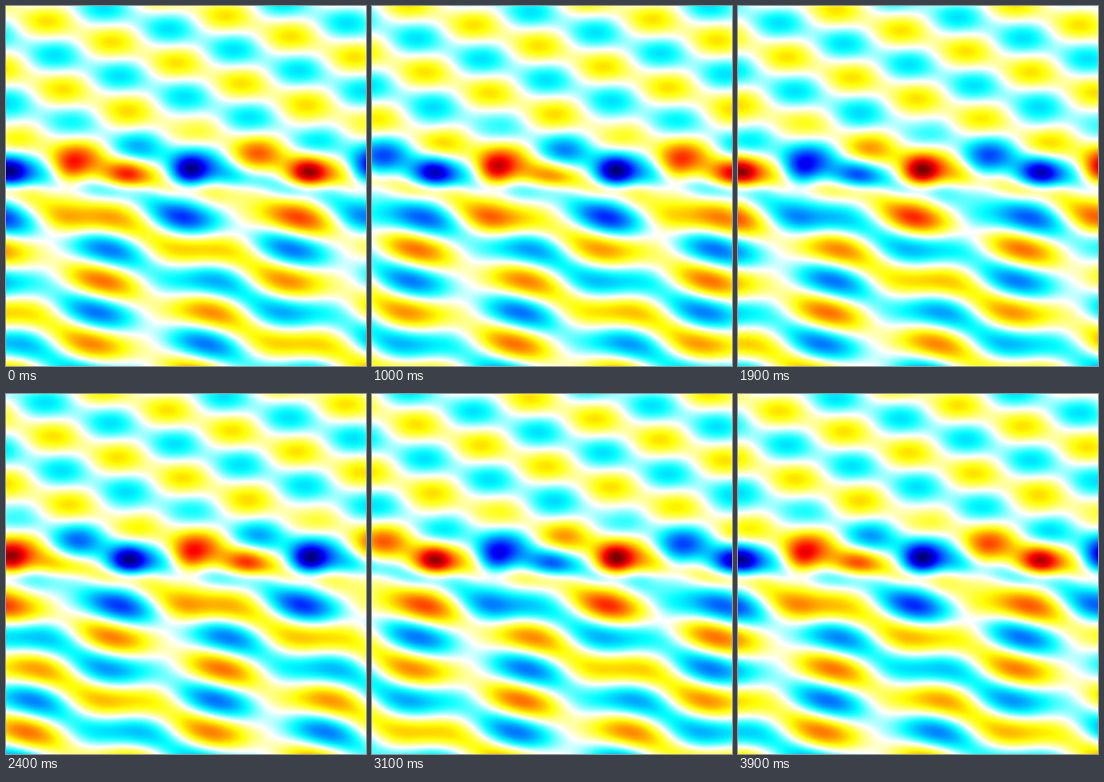
A matplotlib script that plays this animation: 360 px wide and 360 px high, repeating every 4000 ms.

```python
import numpy as np
import matplotlib.pyplot as plt
from matplotlib.animation import FuncAnimation
from matplotlib.colors import LinearSegmentedColormap

SIZE, FRAMES, STEP_MS = 360, 40, 100
PITCH = 60                      # grating period in pixels
WAVELENGTH = 60
BLOCH = np.radians(110)         # phase advance from one cell to the next
SPOT_X, SPOT_Y = 2, 165
SEAM_Y, SEAM_W = 178, 4

x, y = np.meshgrid(np.arange(SIZE) + 0.5, np.arange(SIZE) + 0.5)


def plane(amp, order, direction, cycles):
    """Plane wave of a diffraction order; direction -1 goes up, +1 down."""
    kx = BLOCH / (2 * np.pi * PITCH) + order / PITCH
    ky = direction * np.sqrt(WAVELENGTH ** -2 - kx ** 2)
    return amp * np.exp(2j * np.pi * (kx * x + ky * y + cycles))


def bump(dx, dy, cx, cy, sx, sy, slope=0.0):
    u = dx - cx
    v = dy - cy - slope * u
    return np.exp(-0.5 * ((u / sx) ** 2 + (v / sy) ** 2))


def cell(dx, dy):
    """Near field around one element of the grating."""
    core = 0.56 * bump(dx, dy, 0, 0, 12.5, 10.5)
    halo = 0.22 * bump(dx, dy, 0, 0, 25, 16)
    top = 0.11 * bump(dx, dy, 0, -43, 15, 10)
    neck = 0.22 * bump(dx, dy, 3, 23, 15, 11)
    lobe = (0.18 + 0.2j) * bump(dx, dy, -6, 47, 19, 11, 0.2)
    swirl = 1j * (0.25 * bump(dx, dy, 9, -16, 18, 12)
                  - 0.23 * bump(dx, dy, -16, 4, 15, 10))
    return core + halo + top + neck + lobe + swirl


def build_field():
    above = plane(0.20, 0, -1, 0.035) + plane(0.105, -1, -1, 0.654)
    below = (plane(0.29, 0, -1, 0.88) + plane(0.14, 0, 1, 0.152)
             + plane(0.10, -1, 1, -0.178))
    mix = 1 / (1 + np.exp(-(y - SEAM_Y) / SEAM_W))
    field = above * (1 - mix) + below * mix
    for n in range(-1, 8):
        phase = np.exp(1j * (BLOCH * n - np.radians(165)))
        field = field + phase * cell(x - SPOT_X - PITCH * n, y - SPOT_Y)
    return field


field = build_field()
cmap = LinearSegmentedColormap.from_list("wave", [
    (0.0, (0, 0, 0.5)), (0.125, (0, 0, 1)), (0.375, (0, 1, 1)),
    (0.5, (1, 1, 1)),
    (0.625, (1, 1, 0)), (0.875, (1, 0, 0)), (1.0, (0.5, 0, 0)),
], N=512)

fig = plt.figure(figsize=(3.6, 3.6), dpi=100)
ax = fig.add_axes([0, 0, 1, 1])
ax.axis("off")
image = ax.imshow(field.real, cmap=cmap, vmin=-1, vmax=1,
                  interpolation="nearest", aspect="auto")


def draw(i):
    image.set_data((field * np.exp(-2j * np.pi * i / FRAMES)).real)
    return [image]


anim = FuncAnimation(fig, draw, frames=FRAMES, interval=STEP_MS,
                     repeat=True, repeat_delay=0)
plt.show()
```
